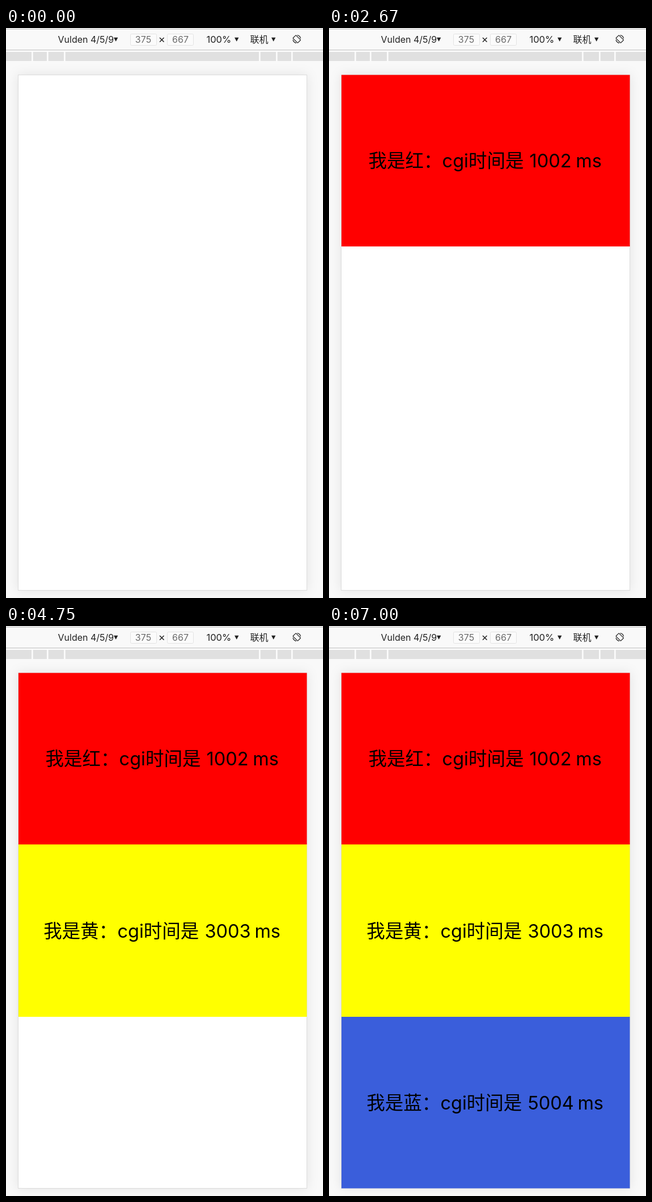
These frames come from a looping animation (559x1002 px, 7.08 s). An HTML page:

```html
<!DOCTYPE html>
<html lang="zh-CN">
<head>
<meta charset="utf-8">
<title>Loading blocks</title>
<style>
  html, body { margin: 0; width: 100%; height: 100%; overflow: hidden; background: #f9f9f9; }
  svg { position: absolute; left: 0; top: 0; display: block; }
  .bar { font: 16px Inter, "Noto Sans CJK SC", "Noto Sans CJK", sans-serif; fill: #222; }
  .dim { fill: #6b6b6b; text-anchor: middle; }
  .label { font: 32.5px Inter, "Noto Sans CJK SC", "Noto Sans CJK", sans-serif; fill: #000; }
  .han { font-family: "Noto Sans CJK SC", "Noto Sans CJK", sans-serif; }
  .block { opacity: 0; }
  .shadow { filter: drop-shadow(0 0 10px rgba(0, 0, 0, .09)); }
</style>
</head>
<body>
<svg id="stage" width="559" height="1002" viewBox="0 0 559 1002">
  <rect width="559" height="1002" fill="#f9f9f9"/>
  <rect class="shadow" x="21.5" y="82.5" width="509" height="906" fill="#fff" stroke="#dcdcdc"/>

  <g id="toolbar" class="bar">
    <rect width="559" height="39" fill="#f9f9f9"/>
    <path d="M0 1.75H559M0 38.75H559" stroke="#c8c8c8" stroke-width="1.5"/>
    <text x="91.5" y="26">Vulden 4/5/9</text>
    <g fill="#fbfbfb" stroke="#e3e3e3">
      <rect x="219.5" y="10.5" width="46" height="20" rx="2"/>
      <rect x="284.5" y="10.5" width="46" height="20" rx="2"/>
    </g>
    <text class="dim" x="242" y="26">375</text>
    <text class="dim" x="307.5" y="26">667</text>
    <path d="M271 17l7.5 7.5M278.500 17l-7.5 7.5" stroke="#222" stroke-width="1.5"/>
    <text x="353.5" y="26" font-size="16.5">100%</text>
    <text class="han" x="430.500" y="26">联机</text>
    <g fill="none" stroke="#222" stroke-width="1.2">
      <rect x="509" y="13.500" width="7.500" height="12" rx="1" transform="rotate(-45 512.75 19.5)"/>
      <path d="M513.5 12.700A7 7 0 0 1 519.500 18.500M512 26.300A7 7 0 0 1 506 20.500"/>
    </g>
  </g>

  <g id="ruler">
    <rect y="39.500" width="559" height="19" fill="#fbfbfb"/>
    <rect y="42" width="559" height="16" fill="#e0e0e0"/>
  </g>
  <g id="blocks"></g>
</svg>
<script>
  const LOOP = 7080;
  const BLOCKS = [
    { name: '红', ms: 1002, color: '#ff0000', top: 82.5, bottom: 384, shift: 0, at: 1500 },
    { name: '黄', ms: 3003, color: '#ffff00', top: 384, bottom: 687, shift: -3.2, at: 2750 },
    { name: '蓝', ms: 5004, color: '#3a5edb', top: 687, bottom: 988.5, shift: -3.2, at: 4830 }
  ];

  const byId = id => document.getElementById(id);

  function add(parent, tag, attrs, text = '') {
    const node = document.createElementNS(parent.namespaceURI, tag);
    for (const key in attrs) node.setAttribute(key, attrs[key]);
    node.textContent = text;
    return parent.appendChild(node);
  }

  for (const x of [190, 403, 468])
    add(byId('toolbar'), 'path', { d: `M${x} 16.800h7.400l-3.700 7z` });

  for (const x of [45, 72, 102, 446, 476, 503])
    add(byId('ruler'), 'rect', { x, y: 42, width: 2.7, height: 16, fill: '#fbfbfb' });

  for (const { name, ms, color, top, bottom, shift, at } of BLOCKS) {
    const group = add(byId('blocks'), 'g', { class: 'block' });
    add(group, 'rect', { x: 22, y: top, width: 508.5, height: bottom - top, fill: color });

    const text = add(group, 'text', { class: 'label', y: Math.round((top + bottom) / 2) + 12 });
    const part = (x, str, cls = '') => add(text, 'tspan', { x: x + shift, class: cls }, str);
    part(69.4, `我是${name}：`, 'han');
    part(199.6, 'cgi');
    part(246, '时间是', 'han');
    part(353.6, ms);
    part(435.2 - shift * 2, 'ms');

    group.animate([
      { opacity: 0, offset: 0, easing: 'step-end' },
      { opacity: 1, offset: at / LOOP, easing: 'step-end' },
      { opacity: 1, offset: 1 }
    ], { duration: LOOP, iterations: Infinity });
  }
</script>
</body>
</html>
```
